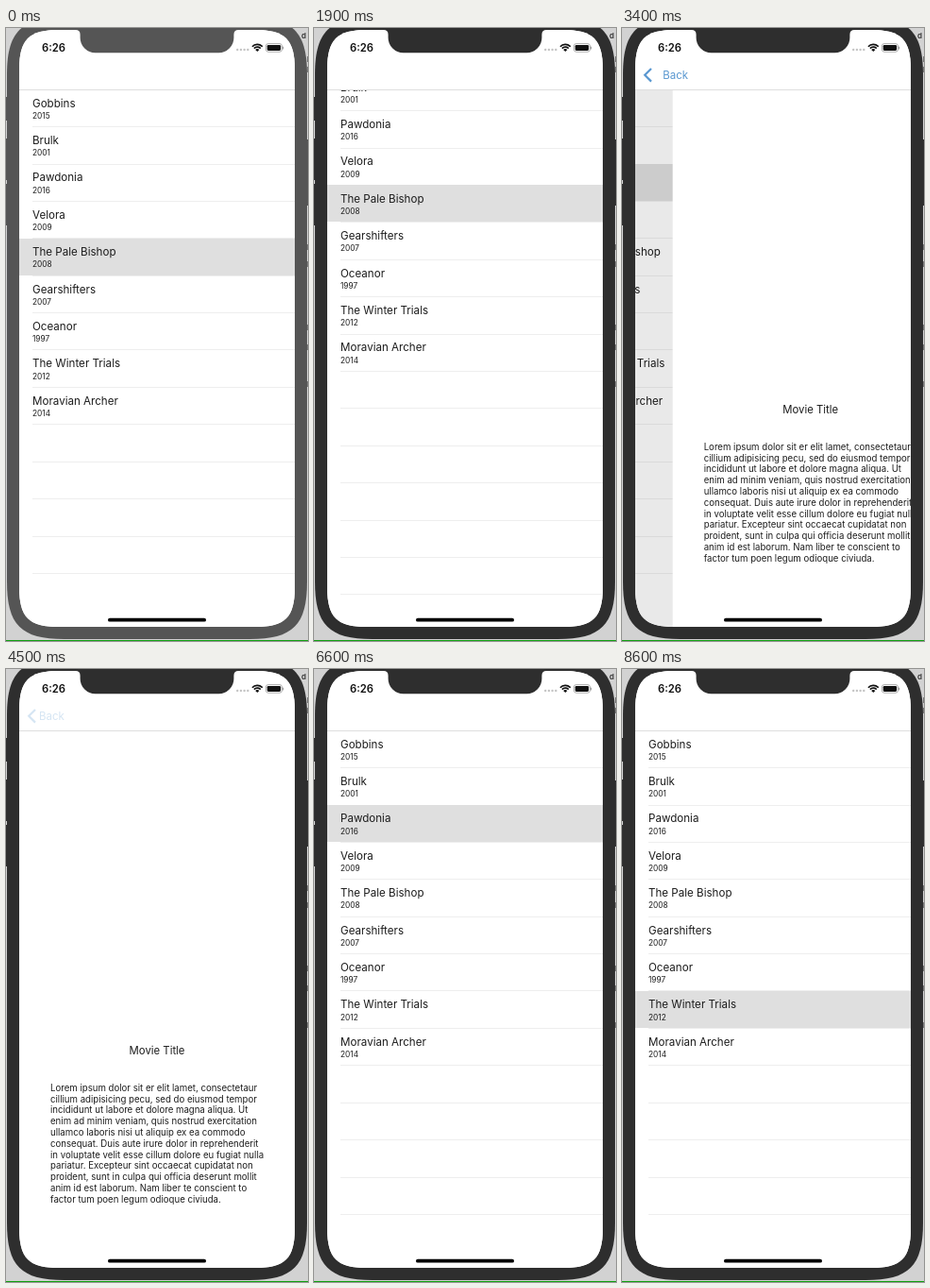
Recreate the animation shown at these times as an HTML page with a canvas. Size 320 by 649 pixels, loop 8900 ms.

```html
<!DOCTYPE html>
<html lang="en">
<head>
<meta charset="utf-8">
<title>Movie list</title>
<style>
html, body { margin: 0; width: 100%; height: 100%; overflow: hidden; background: #d2d2d2; }
canvas { display: block; width: 320px; height: 649px; }
</style>
</head>
<body>
<canvas id="stage"></canvas>
<script>
const W = 320, H = 649, LOOP = 8900, STEP = 100;
const canvas = document.getElementById('stage');
const g = canvas.getContext('2d');
const dpr = window.devicePixelRatio || 1;
canvas.width = W * dpr;
canvas.height = H * dpr;

const SCREEN = { x: 14, y: 2, w: 292, h: 632, r: 31 };
const NAV = 65.5, ROW = 39.4, TOP = 65.2;
const FONT = 'Inter, "Liberation Sans", sans-serif';

const movies = [
  ['Gobbins', 2015], ['Brulk', 2001], ['Pawdonia', 2016], ['Velora', 2009],
  ['The Pale Bishop', 2008], ['Gearshifters', 2007], ['Oceanor', 1997],
  ['The Winter Trials', 2012], ['Moravian Archer', 2014]
];
const synopsis = [
  'Lorem ipsum dolor sit er elit lamet, consectetaur',
  'cillium adipisicing pecu, sed do eiusmod tempor',
  'incididunt ut labore et dolore magna aliqua. Ut',
  'enim ad minim veniam, quis nostrud exercitation',
  'ullamco laboris nisi ut aliquip ex ea commodo',
  'consequat. Duis aute irure dolor in reprehenderit',
  'in voluptate velit esse cillum dolore eu fugiat nulla',
  'pariatur. Excepteur sint occaecat cupidatat non',
  'proident, sunt in culpa qui officia deserunt mollit',
  'anim id est laborum. Nam liber te conscient to',
  'factor tum poen legum odioque civiuda.'
];

function rect(x, y, w, h, color) {
  g.fillStyle = color;
  g.fillRect(x, y, w, h);
}

function round(x, y, w, h, r, color) {
  g.beginPath();
  g.roundRect(x, y, w, h, r);
  g.fillStyle = color;
  g.fill();
}

// Rectangle whose corners ease gradually into the straight edges.
function smoothPath(x, y, w, h, r) {
  const e = r * 1.35, c = e * 0.245, R = x + w, B = y + h;
  g.beginPath();
  g.moveTo(x + e, y);
  g.lineTo(R - e, y);
  g.bezierCurveTo(R - c, y, R, y + c, R, y + e);
  g.lineTo(R, B - e);
  g.bezierCurveTo(R, B - c, R - c, B, R - e, B);
  g.lineTo(x + e, B);
  g.bezierCurveTo(x + c, B, x, B - c, x, B - e);
  g.lineTo(x, y + e);
  g.bezierCurveTo(x, y + c, x + c, y, x + e, y);
}

function text(str, x, y, size, color = '#1c1c1c', weight = 400, align = 'left') {
  g.font = `${weight} ${size}px ${FONT}`;
  g.textAlign = align;
  g.fillStyle = color;
  g.fillText(str, x, y);
}

// Critically damped approach from 0 to 1.
function settle(ms, rate) {
  if (ms <= 0) return 0;
  const p = 1 - (1 + rate * ms) * Math.exp(-rate * ms);
  return p > 0.989 ? 1 : p;
}

// Drag past the edge, then spring back.
function bounce(t, start, peak, size) {
  if (t <= start) return 0;
  if (t < peak) return size * Math.sin((t - start) / (peak - start) * Math.PI / 2);
  return size * (1 - settle(t - peak, 0.012));
}

const scrollAt = t =>
  bounce(t, 600, 1200, 52) + bounce(t, 1550, 2000, -60) + bounce(t, 5700, 6050, -50);

const slide = (t, start) => settle(t - start, 0.014);
const detailAt = t =>
  slide(t, 3150) - slide(t, 4650) + slide(t, 6850) - slide(t, 8050);

const selectedAt = t => t < 3100 ? 4 : t < 6800 ? 2 : 7;
const pressed = t => (t >= 4500 && t < 5200) || t >= 8000;

function drawDesktop() {
  rect(0, 0, W, H, '#d2d2d2');
  text('d', 313, 11, 8, '#333', 600);
  for (const y of [30, 41, 229, 247, 314, 335, 374]) rect(319, y, 1, 6, '#777');
  rect(0, 648, W, 1, '#10a010');
}

function drawBody(color) {
  for (const [y, h] of [[73, 25], [117, 44], [165, 44]]) rect(0, y, 2, h, color);
  rect(318.5, 118, 1.5, 70, color);
  smoothPath(1, -11, 318, 658, 45);
  g.fillStyle = color;
  g.fill();
}

function drawNotch(color) {
  const top = SCREEN.y, bottom = 26.3, left = 78.6, right = 241.4, flare = 5, r = 16;
  g.beginPath();
  g.moveTo(left - flare, 0);
  g.lineTo(left - flare, top);
  g.quadraticCurveTo(left, top, left, top + flare);
  g.arcTo(left, bottom, left + r, bottom, r);
  g.arcTo(right, bottom, right, top + flare, r);
  g.lineTo(right, top + flare);
  g.quadraticCurveTo(right, top, right + flare, top);
  g.lineTo(right + flare, 0);
  g.fillStyle = color;
  g.fill();
}

function drawList(dx, scroll, selected) {
  const { x, w } = SCREEN;
  g.save();
  g.translate(dx, 0);
  rect(x, NAV, w, H, '#fff');
  for (let i = 0; i < 15; i++) {
    const y = TOP + i * ROW + scroll;
    const line = Math.round(y + ROW - 0.5);
    if (i === selected) rect(x, Math.round(y), w, 39, '#dfdfdf');
    if (line < 608) rect(28, line, x + w - 28, 1, '#eee');
    if (!movies[i]) continue;
    text(movies[i][0], 28, y + 18.4, 11.6);
    text(movies[i][1], 28, y + 30.5, 8.3);
  }
  g.restore();
}

function drawDetail(dx) {
  const { x, w } = SCREEN;
  g.save();
  g.translate(dx, 0);
  rect(x, NAV, w, H, '#fff');
  text('Movie Title', x + w / 2, 407.5, 11.35, '#1c1c1c', 400, 'center');
  synopsis.forEach((s, i) => text(s, 47, 446.8 + i * 11.8, 9.64));
  g.restore();
}

function drawNav(p, dimmed) {
  const { x, w } = SCREEN;
  rect(x, 0, w, NAV, '#fff');
  rect(x, 65, w, 1, '#dedede');
  if (!p) return;
  g.save();
  g.globalAlpha = p * (dimmed ? 0.22 : 1);
  g.strokeStyle = '#3f87c9';
  g.lineWidth = 2.2;
  g.beginPath();
  g.moveTo(31, 43);
  g.lineTo(24.2, 49.8);
  g.lineTo(31, 56.6);
  g.stroke();
  text('Back', 35 + (1 - p) * 60, 54, 11.5, '#3f87c9');
  g.restore();
}

function drawStatus() {
  text('6:26', 38, 25, 11.3, '#111', 600);
  for (let i = 0; i < 4; i++) round(244 + i * 3.7, 21.8, 2.4, 2.4, 1.2, '#c4c4c4');
  g.strokeStyle = '#111';
  g.lineWidth = 1.6;
  for (const r of [7.4, 4.7]) {
    g.beginPath();
    g.arc(266.3, 24.8, r, -Math.PI * 0.76, -Math.PI * 0.24);
    g.stroke();
  }
  g.beginPath();
  g.moveTo(266.3, 25);
  g.arc(266.3, 25, 2.9, -Math.PI * 0.76, -Math.PI * 0.24);
  g.fillStyle = '#111';
  g.fill();
  g.beginPath();
  g.roundRect(275.4, 16.6, 17, 8.6, 2.4);
  g.strokeStyle = '#999';
  g.lineWidth = 0.8;
  g.stroke();
  round(276.7, 17.9, 14.4, 6, 1.3, '#111');
  round(293.1, 19.4, 1.1, 3, 0.5, '#999');
}

function draw(t) {
  const { x, y, w, h, r } = SCREEN;
  const shell = t < 500 ? '#555' : '#2e2e2e';
  const p = Math.max(0, Math.min(1, detailAt(t)));
  g.setTransform(dpr, 0, 0, dpr, 0, 0);
  drawDesktop();
  drawBody(shell);

  g.save();
  smoothPath(x, y, w, h, r);
  g.clip();
  rect(x, y, w, h, '#fff');
  if (p < 1) drawList(-0.3 * w * p, scrollAt(t), selectedAt(t));
  if (p > 0) {
    rect(x, NAV, w, h, `rgba(0,0,0,${0.1 * p})`);
    drawDetail(w * (1 - p));
  }
  drawNav(p, pressed(t));
  drawStatus();
  round(108, 624.8, 104, 3.8, 1.9, '#000');
  g.restore();

  drawNotch(shell);
}

function tick() {
  const t = performance.now() % LOOP;
  draw(Math.floor(t / STEP) * STEP);
  requestAnimationFrame(tick);
}
tick();
</script>
</body>
</html>
```
